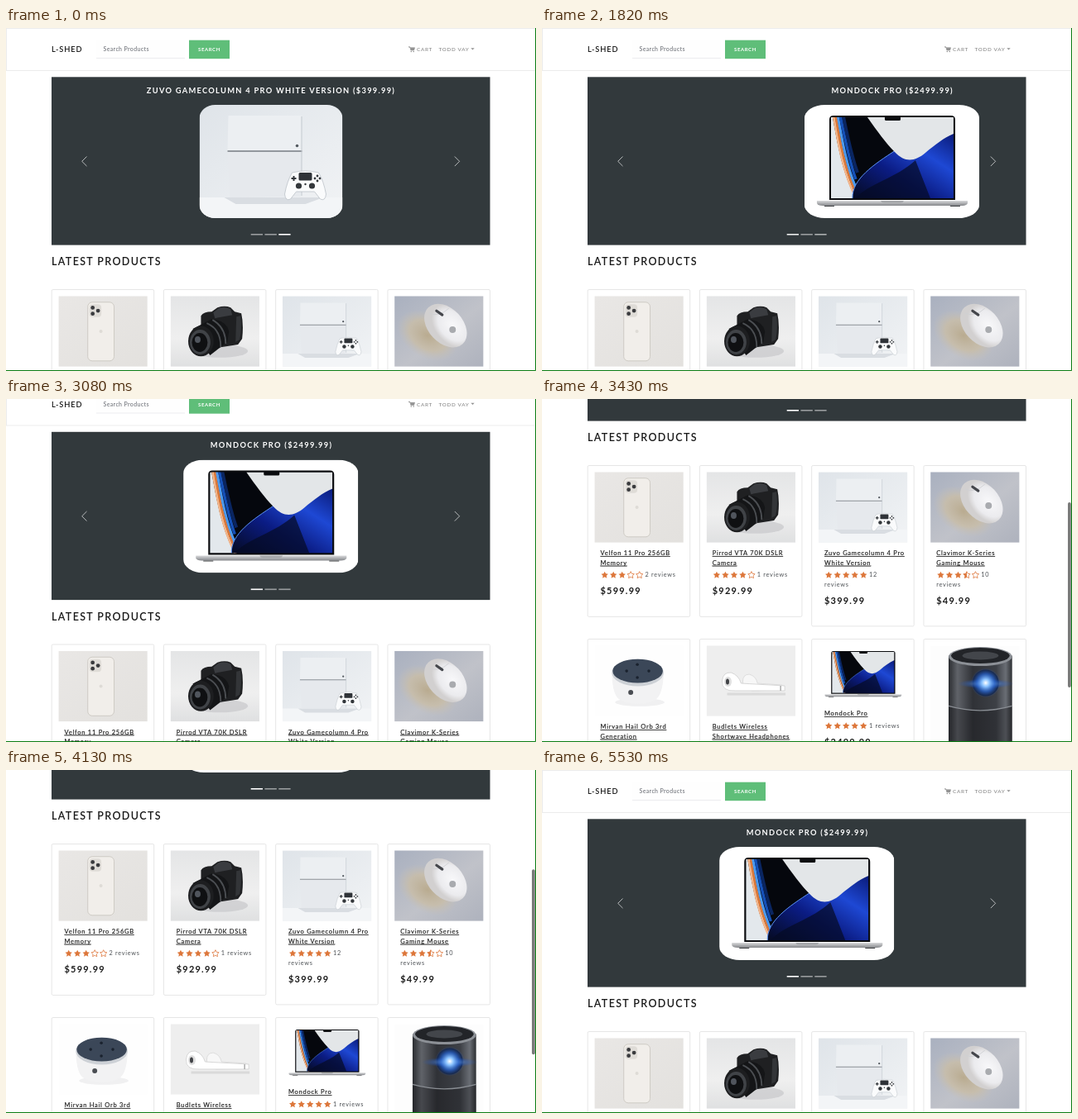
Animation, 640 px wide and 415 px high, one loop 5.6 s. Source, as an HTML page:

```html
<!DOCTYPE html>
<html lang="en">
<head>
<meta charset="utf-8">
<title>Shop demo</title>
<style>
html, body { margin: 0; width: 100%; height: 100%; overflow: hidden; background: #fff; }
svg { display: block; }
#stage { width: 640px; height: 415px; }
text { font-family: Lato, "Open Sans", sans-serif; fill: #1a1a1a; }
.brand { font-size: 9.3px; font-weight: 600; letter-spacing: .85px; }
.hint { font-size: 7px; font-weight: 600; letter-spacing: .35px; fill: #7c7f85; }
.btn { font-size: 6px; font-weight: 700; letter-spacing: .6px; fill: #fff; }
.link { font-size: 6.3px; font-weight: 600; letter-spacing: .7px; fill: #939393; }
.title { font-size: 9.3px; font-weight: 700; letter-spacing: 1.28px; fill: #fff; text-anchor: middle; }
.head { font-size: 12.5px; font-weight: 600; letter-spacing: 1.35px; }
.name { font-size: 7.5px; letter-spacing: .74px; text-decoration: underline; stroke: #1a1a1a; stroke-width: .15px; }
.review { font-size: 7.3px; letter-spacing: .72px; fill: #4c5054; }
.price { font-size: 11px; font-weight: 700; letter-spacing: 1.2px; }
</style>
</head>
<body>
<svg id="stage" viewBox="0 0 640 415">
<defs>
  <linearGradient id="wall" x2="1" y2="1"><stop stop-color="#dfe4e9"/><stop offset="1" stop-color="#f1f3f5"/></linearGradient>
  <linearGradient id="paper" x2="1" y2="1"><stop stop-color="#e9e7e5"/><stop offset="1" stop-color="#e3e1de"/></linearGradient>
  <linearGradient id="studio" x2="0" y2="1"><stop stop-color="#e4e5e6"/><stop offset=".6" stop-color="#efefef"/><stop offset="1" stop-color="#dfe0e1"/></linearGradient>
  <linearGradient id="desk" x2="1" y2="1"><stop stop-color="#a9b0bf"/><stop offset=".55" stop-color="#c0c2c9"/><stop offset="1" stop-color="#aeb2bd"/></linearGradient>
  <linearGradient id="blue" x1="0" y1="1" x2="1" y2="0"><stop stop-color="#050a20"/><stop offset=".4" stop-color="#0b1c84"/><stop offset=".7" stop-color="#1e48d4"/><stop offset="1" stop-color="#0a1a78"/></linearGradient>
  <linearGradient id="metal" x2="0" y2="1"><stop stop-color="#d9dadc"/><stop offset="1" stop-color="#85878b"/></linearGradient>
  <linearGradient id="can"><stop stop-color="#2a2c30"/><stop offset=".14" stop-color="#606369"/><stop offset=".38" stop-color="#303237"/><stop offset=".75" stop-color="#3d4046"/><stop offset=".9" stop-color="#6a6e75"/><stop offset="1" stop-color="#2c2e32"/></linearGradient>
  <radialGradient id="glow"><stop stop-color="#fff"/><stop offset=".25" stop-color="#8cc4ff"/><stop offset=".6" stop-color="#2f6fe0" stop-opacity=".7"/><stop offset="1" stop-color="#1a4fc0" stop-opacity="0"/></radialGradient>
  <radialGradient id="shade"><stop stop-color="#b9ab90"/><stop offset=".6" stop-color="#c8bda8" stop-opacity=".85"/><stop offset="1" stop-color="#c4bfb8" stop-opacity="0"/></radialGradient>
  <radialGradient id="egg" cx=".6" cy=".35"><stop stop-color="#f8f8fa"/><stop offset=".7" stop-color="#ebebee"/><stop offset="1" stop-color="#d2d0d0"/></radialGradient>

  <symbol id="console" viewBox="0 0 173 137">
    <rect width="173" height="137" fill="url(#wall)"/>
    <path d="M0 112H173V137H0Z" fill="#f3f5f7"/>
    <path d="M30 112H150L128 120H44Z" fill="#d9dde2"/>
    <path d="M35 13H123L124 55H34Z" fill="#eceff2"/>
    <path d="M34 57H124L122 111L37 112Z" fill="#e6e9ed"/>
    <path d="M34 56H124" stroke="#777d83" stroke-width="1.300"/>
    <path d="M123.500 14V110" stroke="#c3c9cf" stroke-width="1"/>
    <circle cx="118" cy="49.500" r="1.800" fill="#555b61"/>
    <path d="M112 82Q128 78 144 82Q150 92 153 108Q152 117 146 114L139 105H117L110 114Q104 117 103 108Q106 92 112 82Z" fill="#fafbfc" stroke="#bcc2c8" stroke-width=".8"/>
    <rect x="120" y="82" width="16" height="9.500" rx="1.500" fill="#2f3338"/>
    <path d="M114 86V92M111 89H117" stroke="#33373b" stroke-width="2"/>
    <g fill="#33373b"><circle cx="142.500" cy="86" r="1.400"/><circle cx="142.500" cy="92" r="1.400"/><circle cx="139.500" cy="89" r="1.400"/><circle cx="145.500" cy="89" r="1.400"/><circle cx="120" cy="98" r="3.600"/><circle cx="136" cy="98" r="3.600"/><circle cx="128" cy="96" r="1.200"/></g>
  </symbol>

  <symbol id="laptop" viewBox="0 0 211 137">
    <rect width="211" height="137" fill="#fff"/>
    <path d="M30 115V18Q30 13 35 13H177Q182 13 182 18V115Z" fill="#0b0c0f"/>
    <svg x="32" y="15" width="148" height="98" viewBox="32 15 148 98">
      <rect x="32" y="15" width="148" height="98" fill="#05070d"/>
      <path d="M32 15H34C40 48 46 84 62 113H32Z" fill="#e3e8ec"/>
      <g fill="none">
        <path d="M35 12C41 48 47 84 64 116" stroke="#f3b58a" stroke-width="3"/>
        <path d="M37.500 12C43 46 49 80 64 110" stroke="#d9783a" stroke-width="3"/>
        <path d="M40 12C46 46 51 74 62 100" stroke="#4d9bf0" stroke-width="3"/>
        <path d="M43 12C49 42 54 68 62 90" stroke="#1550b8" stroke-width="3.500"/>
        <path d="M46.500 12C52 38 56 60 64 82" stroke="#0a2560" stroke-width="4"/>
      </g>
      <path d="M58 113C57 90 84 72 110 55L180 34V113Z" fill="url(#blue)"/>
      <path d="M62 113C76 96 112 88 134 67L152 113Z" fill="#050a24" opacity=".7"/>
      <path d="M58 113C57 90 84 72 110 55" fill="none" stroke="#5c92f2" stroke-width="1"/>
      <path d="M76 15C88 32 98 46 109 57C121 70 133 69 146 58C158 48 168 40 180 35V15Z" fill="#e3e6e8"/>
    </svg>
    <rect x="97" y="14" width="19" height="5" rx="1.500" fill="#0b0c0f"/>
    <path d="M15 116H197V119Q196 122 190 122H22Q16 122 15 119Z" fill="url(#metal)"/>
    <path d="M92 116H120Q119 118.500 116 118.500H96Q93 118.500 92 116Z" fill="#a5a7aa"/>
    <path d="M24 122.500H36M176 122.500H188" stroke="#3c3e41" stroke-width="1.200"/>
  </symbol>

  <symbol id="phone" viewBox="0 0 108 86">
    <rect width="108" height="86" fill="url(#paper)"/>
    <rect x="35.500" y="7.500" width="32" height="71.500" rx="5.500" fill="#f1eeea" stroke="#cbc7c1" stroke-width=".9"/>
    <rect x="37.500" y="10" width="14.500" height="15.500" rx="4" fill="#dfdcd7"/>
    <g fill="#3a3b3e"><circle cx="41.500" cy="14.200" r="2.400"/><circle cx="41.500" cy="21.500" r="2.400"/><circle cx="48" cy="17.900" r="2.400"/></g>
    <circle cx="51.500" cy="43" r="2" fill="#dedbd6"/>
  </symbol>

  <symbol id="camera" viewBox="0 0 108 86">
    <rect width="108" height="86" fill="url(#studio)"/>
    <ellipse cx="60" cy="67" rx="34" ry="8" fill="#c3c4c6" opacity=".6"/>
    <path d="M37 24Q40 19 50 19L57 14Q66 11 73 14L78 19L86 21Q89 34 87 52L82 59L56 63L37 48Z" fill="#1f2022"/>
    <path d="M52 20L58 15Q66 12 73 16L75 23L54 27Z" fill="#3a3c40"/>
    <path d="M80 25L85 24Q87 40 84 53L79 56Z" fill="#333538"/>
    <path d="M27 40L50 28Q68 30 71 43L69 56L48 72Z" fill="#141517"/>
    <path d="M44 33Q61 40 61 62M51 29Q67 38 67 58" fill="none" stroke="#4b4e52" stroke-width="1.800"/>
    <ellipse cx="37" cy="55" rx="15.500" ry="18.500" fill="#1d1e20"/>
    <ellipse cx="36" cy="56" rx="12.500" ry="15" fill="#404347"/>
    <ellipse cx="35.500" cy="56.500" rx="9.500" ry="11.500" fill="#0f1012"/>
    <ellipse cx="33" cy="53" rx="3.500" ry="4" fill="#50555d"/>
  </symbol>

  <symbol id="mouse" viewBox="0 0 108 86">
    <rect width="108" height="86" fill="url(#desk)"/>
    <ellipse cx="40" cy="48" rx="40" ry="27" transform="rotate(32 40 48)" fill="url(#shade)"/>
    <ellipse cx="62" cy="36" rx="30.500" ry="21" transform="rotate(47 62 36)" fill="url(#egg)"/>
    <path d="M42 21Q54 26 66 15" fill="none" stroke="#cfd0d4" stroke-width=".9"/>
    <path d="M51 18L58 23" stroke="#45474c" stroke-width="3.200" stroke-linecap="round"/>
    <circle cx="70.500" cy="41" r="4" fill="#a9abaf"/>
  </symbol>

  <symbol id="puck" viewBox="0 0 108 86">
    <rect width="108" height="86" fill="#fefefe"/>
    <ellipse cx="55" cy="69" rx="30" ry="5" fill="#f0f0f1"/>
    <path d="M21 34Q22 62 31 66Q52 76 74 66Q83 60 84 34Z" fill="#f2f2f3"/>
    <ellipse cx="52.500" cy="33" rx="31.500" ry="16.500" fill="#cdd1d6"/>
    <ellipse cx="52.500" cy="31" rx="30.500" ry="14.500" fill="#3b4758"/>
    <g fill="#1a222e"><circle cx="52" cy="23" r="1.800"/><circle cx="39" cy="31" r="1.800"/><circle cx="66" cy="31" r="1.800"/><circle cx="52" cy="39" r="1.800"/></g>
    <circle cx="44" cy="57" r="3" fill="#4a4d52"/>
  </symbol>

  <symbol id="buds" viewBox="0 0 108 86">
    <rect width="108" height="86" fill="#eeeeee"/>
    <path d="M25 59H96" stroke="#dadada" stroke-width="3"/>
    <path d="M44 44Q44 35 52 35Q60 37 62 46L92 48V54L56 55Q44 54 44 44Z" fill="#f7f7f7" stroke="#cfcfcf" stroke-width=".6"/>
    <path d="M19 43Q20 32 30 33Q39 36 42 46L95 49V55L35 55Q18 56 19 43Z" fill="#fff" stroke="#c9c9c9" stroke-width=".7"/>
    <ellipse cx="26" cy="44" rx="4.500" ry="6" fill="#dedede"/>
    <ellipse cx="25.500" cy="44" rx="2" ry="3.600" fill="#414346"/>
    <path d="M90 49V55" stroke="#aaa" stroke-width="1.500"/>
  </symbol>

  <symbol id="speaker" viewBox="0 0 108 170">
    <rect width="108" height="170" fill="#fdfdfd"/>
    <path d="M22 12V154Q60 170 99 154V12Z" fill="url(#can)"/>
    <path d="M22 73Q60 84 99 73V154Q60 170 22 154Z" fill="#17181b" opacity=".35"/>
    <ellipse cx="60.500" cy="13" rx="38.500" ry="11.500" fill="#8c9096"/>
    <ellipse cx="60.500" cy="12" rx="35.500" ry="9.500" fill="#222428"/>
    <ellipse cx="60.500" cy="12" rx="22" ry="5" fill="#43464b"/>
    <path d="M22 73Q60 84 99 73" fill="none" stroke="#8a8e94" stroke-width="1.300"/>
    <circle cx="67" cy="45" r="16" fill="#161b26"/>
    <ellipse cx="67" cy="46" rx="34" ry="6" fill="url(#glow)" opacity=".55"/>
    <circle cx="67" cy="45" r="18" fill="url(#glow)"/>
  </symbol>

  <clipPath id="frame"><rect x="55" y="59" width="530" height="204"/></clipPath>
  <clipPath id="roundA"><rect x="233.500" y="93" width="173" height="137" rx="19" ry="16"/></clipPath>
  <clipPath id="roundB"><rect x="214" y="93" width="211.500" height="137" rx="25" ry="16.500"/></clipPath>
</defs>

<rect width="640" height="415" fill="#fff"/>
<g id="page">
  <rect x=".5" y=".5" width="639" height="51" fill="#fff" stroke="#ececec"/>
  <text class="brand" x="55" y="29">L-SHED</text>
  <rect x="109" y="15" width="107" height="21.500" fill="#fefefe"/>
  <path d="M109 36.500H216" stroke="#ececef"/>
  <text class="hint" x="117.500" y="28.300">Search Products</text>
  <rect x="221" y="14.700" width="49" height="22.500" fill="#5fbe79"/>
  <text class="btn" x="232" y="28.200">SEARCH</text>
  <path d="M486 22.800H487.700L488.800 27H492.600L493.600 23.800H488.200Z" fill="#939393" stroke="#939393" stroke-width=".6"/>
  <circle cx="489.300" cy="28.500" r=".8" fill="#939393"/><circle cx="492.200" cy="28.500" r=".8" fill="#939393"/>
  <text class="link" x="496" y="28">CART</text>
  <text class="link" x="522.500" y="28">TODD VAY</text>
  <path d="M561.300 24.200H565.700L563.500 26.600Z" fill="#939393"/>

  <rect x="55" y="59.300" width="529.500" height="203.300" fill="#32393c"/>
  <g clip-path="url(#frame)">
    <g id="slideA">
      <text class="title" x="320" y="78.500">ZUVO GAMECOLUMN 4 PRO WHITE VERSION ($399.99)</text>
      <g clip-path="url(#roundA)"><use href="#console" x="233.500" y="93" width="173" height="137"/></g>
    </g>
    <g id="slideB">
      <text class="title" x="320.500" y="78.500">MONDOCK PRO ($2499.99)</text>
      <g clip-path="url(#roundB)"><use href="#laptop" x="214" y="93" width="211.500" height="137"/></g>
    </g>
  </g>
  <path d="M97.500 155.500L91.700 161.300L97.500 167.100M541.800 155.500L547.600 161.300L541.800 167.100" fill="none" stroke="#fff" stroke-opacity=".65"/>
  <g fill="#fff"><rect id="dotA" x="295.700" y="249" width="14.300" height="1.600"/><rect x="312.500" y="249" width="14.300" height="1.600" opacity=".5"/><rect id="dotC" x="329.300" y="249" width="14.300" height="1.600"/></g>

  <text class="head" x="55" y="287.300">LATEST PRODUCTS</text>
  <g id="cards"></g>
</g>
<rect id="bar" x="635" width="3.800" height="224" rx="1.900" fill="#7b7b7b"/>
<path d="M639.500 0V414.500H0" fill="none" stroke="#0c7d14"/>
</svg>

<script>
const $ = id => document.getElementById(id);
const LOOP = 5600, STEP = 70;
const SLIDE_AT = 1403, SLIDE_MS = 600, SLIDE_W = 530;
const ORANGE = '#dd773b';

// picture, picture height, name lines, rating, review count, price
const rows = [
  [316, [
    ['phone', 85.5, ['Velfon 11 Pro 256GB', 'Memory'], 3, 2, '$599.99'],
    ['camera', 85.5, ['Pirrod VTA 70K DSLR', 'Camera'], 4, 1, '$929.99'],
    ['console', 85.5, ['Zuvo Gamecolumn 4 Pro', 'White Version'], 5, 12, '$399.99'],
    ['mouse', 85.5, ['Clavimor K-Series', 'Gaming Mouse'], 3.5, 10, '$49.99']]],
  [526, [
    ['puck', 85.5, ['Mirvan Hail Orb 3rd', 'Generation'], 4, 3, '$29.99'],
    ['buds', 85.5, ['Budlets Wireless', 'Shortwave Headphones'], 4, 8, '$159.99'],
    ['laptop', 69.7, ['Mondock Pro'], 5, 1, '$2499.99'],
    ['speaker', 170, [], 0, 0, '']]]
];

const text = (cls, x, y, s) => `<text class="${cls}" x="${x}" y="${y}">${s}</text>`;

function star(cx, cy, fill) {
  const pts = Array.from({ length: 10 }, (_, i) => {
    const a = i * Math.PI / 5, r = i % 2 ? 2.2 : 4.4;
    return [cx + r * Math.sin(a), cy - r * Math.cos(a)].map(v => v.toFixed(2)).join();
  });
  const half = [pts[0], ...pts.slice(5)];
  const poly = (p, style) => `<polygon points="${p.join(' ')}" ${style}/>`;
  const solid = `fill="${ORANGE}"`;
  if (fill >= 1) return poly(pts, solid);
  return poly(pts, `fill="none" stroke="${ORANGE}" stroke-width=".8"`) + (fill > 0 ? poly(half, solid) : '');
}

function card(x, y, [pic, h, lines, rating, count, price]) {
  const wrap = count > 9;
  const tx = x + 15.5;
  let ty = y + 23.5 + h;
  let out = '';
  for (const line of lines) {
    out += text('name', tx, ty, line);
    ty += 11.7;
  }
  if (price) {
    for (let i = 0; i < 5; i++) out += star(x + 20.7 + i * 10.5, ty + 0.7, rating - i);
    out += text('review', x + 69.5, ty + 3, wrap ? count : count + ' reviews');
    if (wrap) {
      ty += 11.5;
      out += text('review', tx, ty + 3, 'reviews');
    }
    ty += 24;
    out += text('price', tx, ty, price);
  }
  const height = ty - y + 26.5;
  return `<rect x="${x + .2}" y="${y + .5}" width="123.500" height="${height}" rx="1.500" fill="#fff" stroke="#e6e6e6"/>` +
    `<use href="#${pic}" x="${x + 8.3}" y="${y + 8.3}" width="107.600" height="${h}"/>` + out;
}

$('cards').innerHTML = rows.map(([y, list]) =>
  list.map((item, i) => card(55 + i * 135.25, y, item)).join('')).join('');

// CSS-like ease-in-out, cubic-bezier(.42, 0, .58, 1)
function easeInOut(x) {
  if (x <= 0 || x >= 1) return x <= 0 ? 0 : 1;
  let lo = 0, hi = 1;
  for (let i = 0; i < 24; i++) {
    const s = (lo + hi) / 2, q = 1 - s;
    if (1.26 * q * q * s + 1.74 * q * s * s + s * s * s < x) lo = s; else hi = s;
  }
  return lo * lo * (3 - 2 * lo);
}

// flick down, flick back up, short bounce past the top
const path = [[3010, 0], [3080, 19.5], [3220, 120], [3430, 236], [3750, 285], [3950, 281],
  [4130, 227], [4270, 88], [4340, 16], [4410, -9.5], [4550, -4], [4760, 0]];

function scrollAt(t) {
  const n = path.length - 1;
  if (t <= path[0][0] || t >= path[n][0]) return 0;
  const k = path.findIndex(p => p[0] > t) - 1;
  const slope = i => i <= 0 || i >= n ? 0 :
    (path[i + 1][1] - path[i - 1][1]) / (path[i + 1][0] - path[i - 1][0]);
  const [t0, a] = path[k], [t1, b] = path[k + 1];
  const d = t1 - t0, u = (t - t0) / d, v = 1 - u;
  return v * v * (1 + 2 * u) * a + u * u * (3 - 2 * u) * b +
    d * u * v * (v * slope(k) - u * slope(k + 1));
}

const move = (id, x, y) => $(id).setAttribute('transform', `translate(${x.toFixed(2)} ${y.toFixed(2)})`);
const fade = (id, v) => $(id).setAttribute('opacity', v.toFixed(3));
const clamp = v => Math.min(1, Math.max(0, v));

function draw(t) {
  const p = easeInOut((t - SLIDE_AT) / SLIDE_MS);
  move('slideA', -p * SLIDE_W, 0);
  move('slideB', (1 - p) * SLIDE_W, 0);
  fade('dotA', 0.5 + p / 2);
  fade('dotC', 1 - p / 2);

  const y = scrollAt(t);
  move('page', 0, -y);
  $('bar').setAttribute('y', 1 + Math.max(0, y) * 0.525);
  fade('bar', t < 3110 ? 0 : 1 - clamp((t - 4800) / 250));
}

function tick() {
  const t = performance.now() % LOOP;
  draw(Math.floor(t / STEP) * STEP);
  requestAnimationFrame(tick);
}
tick();
</script>
</body>
</html>
```
